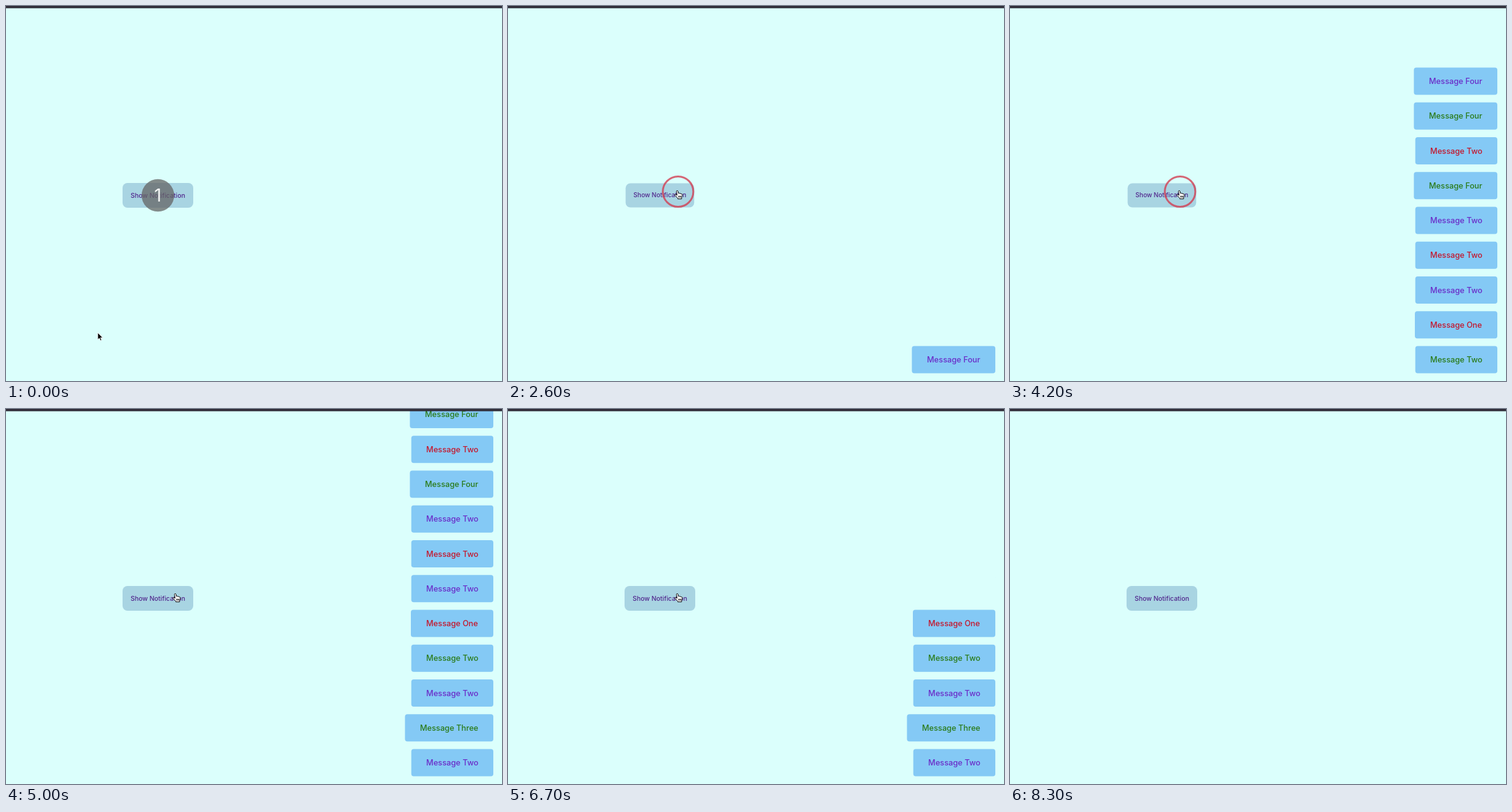
Animation, 800 px wide and 606 px high, one loop 9600 ms. Source, as an HTML page:

```html
<!DOCTYPE html>
<html lang="en">
<head>
<meta charset="utf-8">
<title>Notifications</title>
<style>
  html, body { margin: 0; width: 100%; height: 100%; overflow: hidden; background: #dbfffc; }
  svg { display: block; width: 100vw; height: 100vh; }
  text { font-family: Poppins, Inter, sans-serif; text-anchor: middle; }
  .toast { font-size: 12.7px; font-weight: 500; }
  .label { font-size: 10.4px; font-weight: 450; fill: #50268c; }
</style>
</head>
<body>
<svg viewBox="0 0 800 606">
  <rect width="800" height="606" fill="#dbfffc"/>
  <g id="button">
    <rect x="188" y="286" width="114" height="40" rx="8" fill="#a8d4e2"/>
    <text class="label" x="245" y="309.5">Show Notification</text>
  </g>
  <g id="count">
    <circle cx="245" cy="306" r="26.3" fill="#646464" fill-opacity=".75"/>
    <text x="245" y="316" font-size="29" fill="#fff" fill-opacity=".92">1</text>
  </g>
  <g id="toasts"></g>
  <circle id="ring" cx="274.3" cy="300" r="24.6" fill="none" stroke="#d23c50" stroke-opacity=".78" stroke-width="3"/>
  <path id="arrow" d="M0 0V11.2L2.6 8.8L4.3 12.8L6.2 12L4.5 8.1H8Z" fill="#000" stroke="#fff" stroke-width=".8" stroke-linejoin="round"/>
  <path id="hand" d="M-1.3 .8C-1.3-.4 1-.4 1.2 .8L2 4.4C2.5 3.6 4 3.8 4.2 4.8C4.8 4.1 6 4.3 6.2 5.3C7.2 4.7 8 5.4 8 6.4C8.1 9 7.4 10 7 11.2V13.2H.8V12C-.8 10.6-2.2 8.8-3.6 7.4C-4.5 6.2-3.1 5.4-2.1 6.2L-.3 7.5ZM2.4 8.2V11M4.2 8.2V11M5.9 8.2V11" fill="#fff" stroke="#000" stroke-width="1" stroke-linejoin="round"/>
  <rect width="800" height="3.6" fill="#302d39"/>
</svg>
<script>
const LOOP = 9600, STEP = 100, LIFE = 3000, GAP = 56.27;
const widths = { One: 133, Two: 132.3, Three: 142.5, Four: 134.6 };
const red = '#c4162c', green = '#2a7b18', purple = '#6a2cc8';
const messages = [
  [2500, 'Four', purple], [2700, 'Four', green], [3000, 'Two', red],
  [3200, 'Four', green], [3400, 'Two', purple], [3500, 'Two', red],
  [3700, 'Two', purple], [3900, 'One', red], [4100, 'Two', green],
  [4400, 'Two', purple], [4600, 'Three', green], [4800, 'Two', purple]
];
// time, x, y of the pointer tip
const path = [
  [0, 148, 528], [800, 23, 548], [1000, 23, 548], [2000, 299, 292],
  [2400, 273, 298.5], [8100, 273, 298.5], [8200, 176, 335]
];

const $ = id => document.getElementById(id);
const show = (el, on) => el.setAttribute('visibility', on ? 'visible' : 'hidden');
const ease = p => p * p * (3 - 2 * p);

function make(tag, attrs, parent) {
  const el = document.createElementNS('http://www.w3.org/2000/svg', tag);
  for (const key in attrs) el.setAttribute(key, attrs[key]);
  return parent.appendChild(el);
}

const toasts = messages.map(([time, word, color]) => {
  const g = make('g', {}, $('toasts')), w = widths[word];
  make('rect', { x: 786 - w, y: 0, width: w, height: 44, rx: 4, fill: '#84c9f5' }, g);
  make('text', { class: 'toast', x: 786 - w / 2, y: 26.6, fill: color }, g).textContent = 'Message ' + word;
  return { g, time };
});

function pointer(t) {
  let i = 1;
  while (i < path.length - 1 && t > path[i][0]) i++;
  const [t0, x0, y0] = path[i - 1], [t1, x1, y1] = path[i];
  const p = ease(Math.min(1, (t - t0) / (t1 - t0)));
  return [x0 + (x1 - x0) * p, y0 + (y1 - y0) * p];
}

function draw(t) {
  const added = toasts.filter(m => m.time <= t).length;
  toasts.forEach((m, i) => {
    show(m.g, i < added && t < m.time + LIFE);
    m.g.setAttribute('transform', `translate(0 ${549.6 - GAP * (added - 1 - i)})`);
  });

  // the button is held just before each message appears
  const next = toasts[added];
  const hold = added === 9 ? 200 : 100;
  const down = next && t >= next.time - hold;
  const since = added ? t - toasts[added - 1].time : LIFE;
  $('button').setAttribute('transform', down ? 'translate(245 306) scale(.97) translate(-245 -306)' : '');
  $('ring').setAttribute('opacity', down ? 1 : Math.max(0, 0.6 - since / 330));

  const [x, y] = pointer(t);
  const over = x > 188 && x < 302 && y > 286 && y < 326;
  const move = `translate(${x} ${y})`;
  $('arrow').setAttribute('transform', move);
  $('hand').setAttribute('transform', move);
  show($('arrow'), !over && t < 8300);
  show($('hand'), over && t < 8300);
  show($('count'), t < 100);
}

let start;
function tick(now) {
  if (start === undefined) start = now;
  const t = (now - start) % LOOP;
  draw(Math.floor(t / STEP) * STEP);
  requestAnimationFrame(tick);
}
draw(0);
requestAnimationFrame(tick);
</script>
</body>
</html>
```
